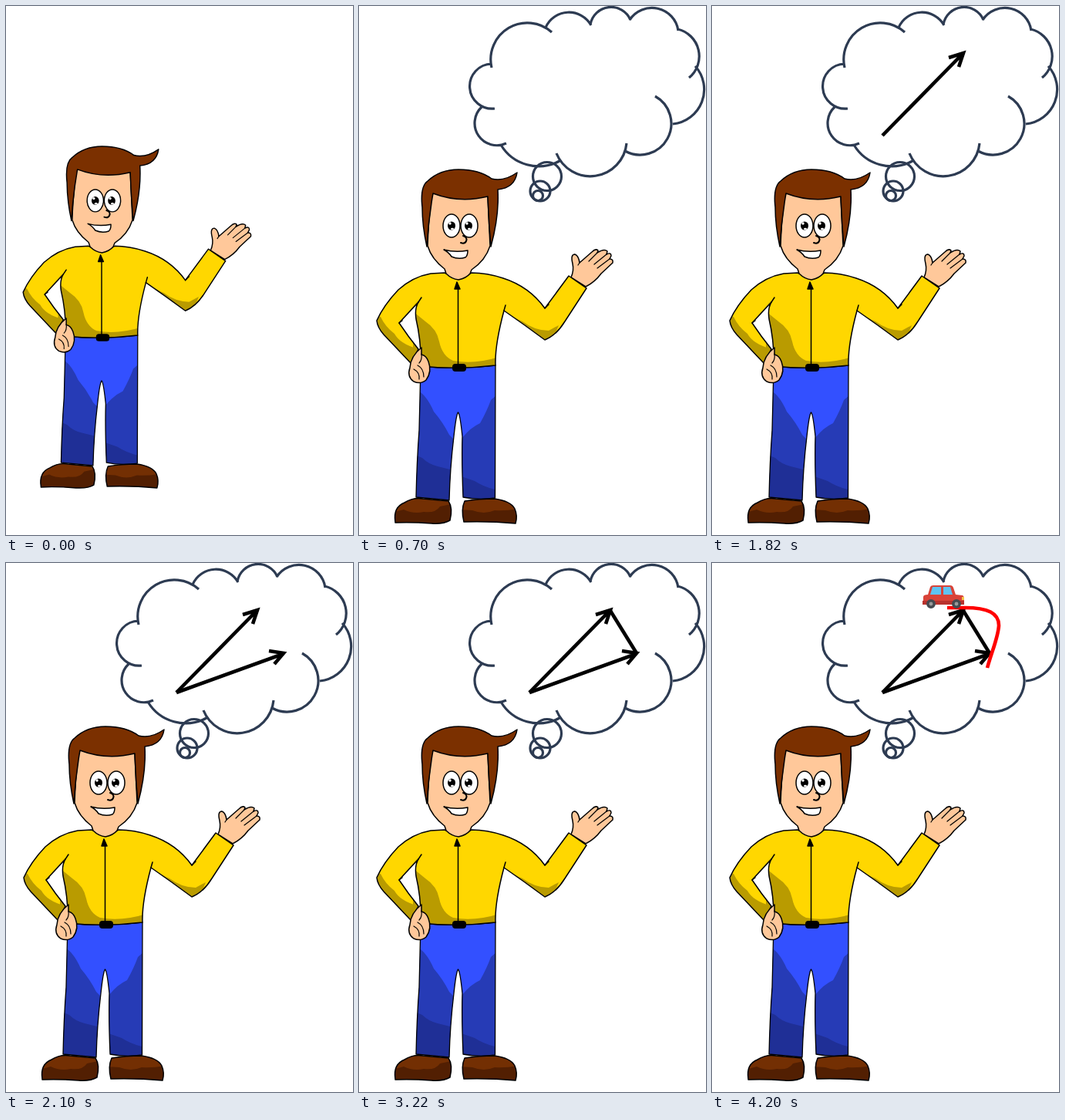
Animation, 450 px wide and 686 px high, one loop 4900 ms. Source, as an HTML page:

```html
<!DOCTYPE html>
<html lang="en">
<head>
<meta charset="utf-8">
<title>Thinking about vectors</title>
<style>
  html, body { margin: 0; height: 100%; overflow: hidden; background: #fff; }
  svg { display: block; }
  .line { fill: none; }
</style>
</head>
<body>
<svg width="450" height="686" viewBox="0 0 450 686">
  <defs>
    <path id="shirtShape" d="M93 347Q70 351 51 368Q32 388 23 408Q24 417 32 426L67 463L77 445Q64 429 52 411L77 384Q72 392 74 406Q81 436 80 467Q128 472 177 466Q176 440 188 395Q214 413 241 433Q256 427 267 409L295 366L272 350L241 392Q221 364 187 353Q166 346 146 346L129 354L111 346Z"/>
    <path id="pantsShape" d="M80 467Q128 472 177 466L176.500 638Q155 641 135 637Q133 590 134 558Q131 529 128.500 527Q126 530 123 558Q118 600 117 641L74 637Q75 590 78 550Z"/>
    <path id="leftShoe" d="M47 669Q44 650 59 644Q70 637 83 639L116 642Q122 651 118 667Q110 672 94 671Q68 669 47 670Z"/>
    <path id="rightShoe" d="M136 669Q132 653 137 642Q155 639 176 639Q197 642 202 652Q206 661 203 671Q170 668 136 669Z"/>
    <clipPath id="shirtClip"><use href="#shirtShape"/></clipPath>
    <clipPath id="pantsClip"><use href="#pantsShape"/></clipPath>
    <clipPath id="shoeClip"><use href="#leftShoe"/><use href="#rightShoe"/></clipPath>
  </defs>

  <g id="man" stroke="#000" stroke-width="1.5" stroke-linejoin="round" stroke-linecap="round">
    <!-- Trousers and shoes -->
    <g clip-path="url(#pantsClip)" stroke="none">
      <path fill="#3350ff" d="M70 460H182V645H70Z"/>
      <path fill="#263bb6" d="M70 499L80 501Q89 508 97 526Q109 540 117 556L123 562L134 560Q144 547 157 541Q166 525 171 511L180 503V645H70Z"/>
      <path fill="#1f2f96" d="M70 581L82 586Q90 594 102 597L122 602V645H70ZM130 609L150 616Q162 624 180 628V645H130Z"/>
    </g>
    <use href="#pantsShape" class="line" stroke-width="1.3"/>
    <g clip-path="url(#shoeClip)" stroke="none">
      <path fill="#732f03" d="M40 635H210V675H40Z"/>
      <path fill="#521f02" d="M40 658L58 653Q70 659 84 656Q99 658 105 649L124 645V675H40ZM130 653L147 654Q162 660 176 654Q190 655 207 652V675H130Z"/>
    </g>
    <use href="#leftShoe" class="line"/>
    <use href="#rightShoe" class="line"/>

    <!-- Right hand -->
    <path fill="#ffc89a" d="M275 352Q279 343 277 334Q274 322 280 322Q285 324 286 333L302 319Q307 314 310 317L309 320Q318 314 322 318L321 322Q327 319 327 324L325 328Q330 328 329 333L314 347Q306 358 294 364Z"/>
    <path class="line" stroke-width="1.2" d="M309 320L298 331M321 322L305 335M325 328L309 340M286 333L284 336"/>

    <!-- Shirt -->
    <g clip-path="url(#shirtClip)" stroke="none">
      <path fill="#ffd700" d="M15 340H300V475H15Z"/>
      <path fill="#b99b00" d="M15 404L28 403Q34 416 46 425Q53 438 75 444L64 468L15 430ZM76 383L52 410L58 414L72 392Z
        M70 396L86 409Q101 419 104 435Q108 454 122 460Q150 465 182 455V475H70ZM186 394Q202 405 212 409Q228 421 246 421L259 414L250 436H230Z"/>
    </g>
    <use href="#shirtShape" class="line"/>
    <path class="line" d="M77 384L81 378M188 395L190 388M241 392L246 387M52 411L56 408"/>
    <path class="line" d="M128.500 365V466"/>
    <path d="M127 358L124 367H131Z"/>
    <rect x="122" y="465" width="16" height="8" rx="3" stroke-width="2"/>

    <!-- Left hand -->
    <path fill="#ffc89a" d="M81 443Q67 454 66 469Q62 481 71 487Q80 491 87 485Q95 474 90 461Q87 453 81 452Z"/>
    <path class="line" stroke-width="1.2" d="M81 451Q82 459 78 463M76 466Q84 470 84 481M71 471Q79 475 78 484"/>

    <!-- Head -->
    <path fill="#ffc89a" d="M95 243Q90 275 89 311Q94 328 111 341L113 347Q120 354 129 355Q139 353 144 347L146 342Q164 330 170 311L167 247Z"/>
    <path fill="#7b3000" d="M88 312Q82 285 82 261Q79 234 89 227Q105 212 129 212Q156 212 172 224Q188 228 205 216Q202 236 180 238Q182 272 171 312Q168 280 167 247Q130 256 96 243Q90 277 88 312Z"/>
    <g fill="#fff">
      <ellipse cx="120" cy="285" rx="11" ry="15"/>
      <ellipse cx="143" cy="285" rx="11" ry="15"/>
      <path d="M110 316Q125 320 141 317Q141 324 138 326Q129 329 120 325Q116 319 110 316Z"/>
    </g>
    <g stroke="none">
      <ellipse cx="120" cy="285" rx="5" ry="5.500"/>
      <ellipse cx="142" cy="285" rx="5" ry="5.500"/>
      <g fill="#fff">
        <circle cx="118" cy="282" r="1.700"/><circle cx="140" cy="282" r="1.700"/>
        <ellipse cx="121" cy="289" rx="2" ry="1.300"/><ellipse cx="143" cy="289" rx="2" ry="1.300"/>
      </g>
    </g>
    <path class="line" stroke-width="2" d="M135 298Q141 300 139 305Q137 309 132 307"/>
  </g>

  <!-- Thought, one part per step -->
  <g data-step="1" fill="none" stroke="#2d3b52" stroke-width="3.2">
    <path d="M172 80A47.500 47.500 0 0 1 250 34M242 28A33 33 0 0 1 301 25M300 24A27.300 27.300 0 0 1 352 18M351 18A34.500 34.500 0 0 1 414 32M413 30A36 36 0 0 1 428 93M436 78A45 45 0 0 1 407 153M384 117A40.500 40.500 0 0 1 345 188M347 178A47.300 47.300 0 0 1 256 191M260 201A57 57 0 0 1 184 180M191 178A28.800 28.800 0 0 1 159 131M176 133A29.100 29.100 0 1 1 172 75"/>
    <circle cx="244" cy="221" r="18.5"/>
    <circle cx="235" cy="240" r="13"/>
    <circle cx="232" cy="246" r="6.5"/>
  </g>
  <g fill="none" stroke="#000" stroke-width="4.6">
    <path data-step="2" d="M221 168L325 62M307 67L326 61L320 79"/>
    <path data-step="3" d="M221 168L359 118M341 114L360 117L348 131"/>
    <path data-step="4" d="M326 62L360 117"/>
    <path data-step="5" stroke="#f00" d="M305 58H328C358 58 372 65 372 81C371 97 363 114 357 136"/>
  </g>
  <g data-step="6">
    <path fill="#d94338" d="M280 41L283 31Q284 29 287 29H309Q312 29 313 32L316 41L325 42Q327 43 327 47V53H274V44Q274 41 280 41Z"/>
    <path fill="#b8322d" d="M273 49H327V54H273Z"/>
    <path fill="#5ec3f1" d="M286 31H297V41H283ZM300 31H309L312 41H300Z"/>
    <path fill="#f5c84b" d="M324 44H327V48H324Z"/>
    <g fill="#999" stroke="#454a50" stroke-width="3.5">
      <circle cx="284" cy="53" r="4.2"/>
      <circle cx="317" cy="53" r="4.2"/>
    </g>
  </g>
</svg>
<script>
  const STEP_MS = 700, STEPS = 7;
  const man = document.getElementById('man');
  const parts = document.querySelectorAll('[data-step]');

  function draw(now) {
    const step = Math.floor(now / STEP_MS) % STEPS;
    man.setAttribute('transform', step ? '' : 'matrix(.965 0 0 .965 0 -22.6)');
    for (const part of parts) {
      part.style.visibility = step >= part.dataset.step ? 'visible' : 'hidden';
    }
  }

  const start = performance.now();
  function tick() {
    draw(performance.now() - start);
    requestAnimationFrame(tick);
  }
  tick();
</script>
</body>
</html>
```
